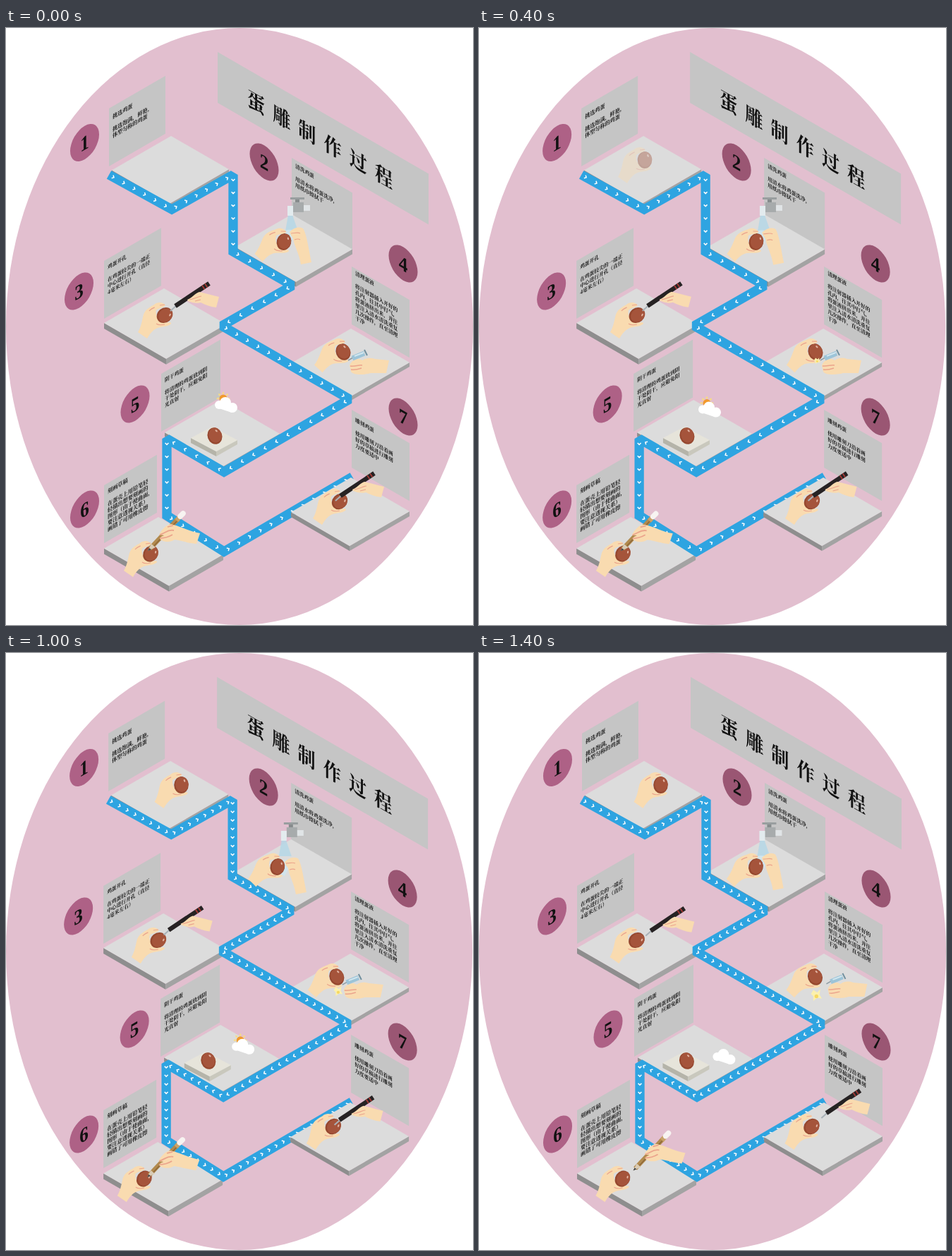
An HTML page for the animation above (1600 ms loop, 662x846 px).

```html
<!DOCTYPE html>
<html lang="zh-CN">
<head>
<meta charset="utf-8">
<style>
html, body { margin: 0; width: 100%; height: 100%; overflow: hidden; background: #fff; }
svg { display: block; width: 100vw; height: 100vh; }
text { font-family: "Noto Serif CJK SC", "Noto Sans CJK SC", "Noto Sans CJK", serif; font-weight: bold; fill: #111; }
.num { font-family: "Liberation Serif", "Noto Serif", serif; text-anchor: middle; }
</style>
</head>
<body>
<svg id="stage" viewBox="0 0 662 846" xmlns="http://www.w3.org/2000/svg"></svg>
<script>
const STEP = 200, COUNT = 8, SLOPE = 0.577;
const SKIN = '#f9dbb0', PINK = '#eba48c', GREY = '#c5c5c5', BLUE = '#2ea4e1';

const poly = (pts, fill) => `<polygon points="${pts}" fill="${fill}"/>`;
const path = (d, fill, extra = '') => `<path d="${d}" fill="${fill}" ${extra}/>`;
const line = (d, color, w, extra = '') => path(d, 'none', `stroke="${color}" stroke-width="${w}" ${extra}`);
const rect = (x, y, w, h, fill) => `<rect x="${x}" y="${y}" width="${w}" height="${h}" fill="${fill}"/>`;
const iso = (x, y, side) => `transform="matrix(.866 ${side * 0.5} 0 1 ${x} ${y})"`;

// Upright isometric wall; side -1 rises to the right, 1 falls
function wall(x, y, w, h, side) {
  const rise = side * w * SLOPE;
  return path(`M${x} ${y}l${w} ${rise}v${h}l${-w} ${-rise}z`, GREY);
}

// Flat isometric box: top corner, reach to the right and left, thickness
function slab(x, y, a, b, h) {
  const right = [x + a, y + a * SLOPE], left = [x - b, y + b * SLOPE];
  const front = [x + a - b, y + (a + b) * SLOPE];
  const down = ([px, py]) => [px, py + h];
  return poly([left, front, down(front), down(left)], '#8e8e8e') +
    poly([front, right, down(right), down(front)], '#a3a3a3') +
    poly([[x, y], right, front, left], '#dcdcdc');
}

const cards = [
  { side: -1, x: 146, y: 114, w: 80, badge: [111.5, 162.5], top: 129, size: 8.2,
    text: '挑选鸡蛋||挑选饱满，鲜艳，|体型匀称的鸡蛋' },
  { side: 1, x: 405, y: 184, w: 86, badge: [366, 190], top: 198,
    text: '清洗鸡蛋||用清水将鸡蛋洗净，|用纸巾擦拭干' },
  { side: -1, x: 139, y: 330, w: 81, badge: [103.5, 373], top: 342,
    text: '鸡蛋开孔||在鸡蛋较尖的一端正|中心进行开孔（直径|4毫米左右）' },
  { side: 1, x: 490, y: 338, w: 82, badge: [563, 334], top: 350,
    text: '清理蛋液||将注射器插入开好的|孔内，往其中打气，|将蛋液挤出来，并往|里注入清水清洗重复|几次操作，直至清理|干净' },
  { side: -1, x: 220, y: 490, w: 84, badge: [183, 533], top: 502,
    text: '阴干鸡蛋||将清理的鸡蛋放到阴|干处阴干，应避免阳|光直射' },
  { side: -1, x: 139, y: 648, w: 75, badge: [111.5, 682], top: 660, size: 8.3,
    text: '刻画草稿||在蛋壳上用铅笔轻|轻描出想要刻画的|图形（由于使曲面，|要注意透视关系）|画错了可用橡皮擦' },
  { side: 1, x: 490, y: 541, w: 82, badge: [563, 551], top: 558,
    text: '雕刻鸡蛋||使用雕刻刀沿着画|好的草稿进行雕刻|力度要适中' }
];

function card({ side, x, y, w, badge, top, text, size = 7.75 }, i) {
  const rows = text.split('|').map((s, n) => `<text y="${n * 9}" font-size="${size}">${s}</text>`).join('');
  return wall(x, y, w, 82, side) +
    `<g ${iso(...badge, side)}><circle r="23.7" fill="${side < 0 ? '#ae6186' : '#9a5673'}"/>` +
    `<text class="num" y="10" font-size="29">${i + 1}</text></g>` +
    `<g ${iso(x + 5, top, side)}>${rows}</g>`;
}

const route = [[146, 208], [235, 257], [322, 208], [322, 317], [406, 365], [306, 422],
  [487, 526], [309, 629], [228, 582], [228, 691], [309, 742], [491, 636]];

function arrows(gap) {
  let d = '';
  for (let i = 1; i < route.length; i++) {
    const [x, y] = route[i - 1], dx = route[i][0] - x, dy = route[i][1] - y;
    const length = Math.hypot(dx, dy), n = Math.round(length / gap);
    const ux = dx / length, uy = dy / length;
    const spot = (cx, cy, a, b) => `${cx + a * ux - b * uy} ${cy + a * uy + b * ux}`;
    for (let k = 0; k < n; k++) {
      const f = (k + 0.4) / n, cx = x + dx * f, cy = y + dy * f;
      d += `M${spot(cx, cy, -1.2, -2.4)}L${spot(cx, cy, 1.2, 0)}L${spot(cx, cy, -1.2, 2.4)}`;
    }
  }
  return line(d, '#fff', 1.5, 'class="arrows"');
}

const scene =
  wall(300, 34, 299, 72, 1) +
  `<text ${iso(342, 109, 1)} font-size="29" letter-spacing="12.8">蛋雕制作过程</text>` +
  cards.map(card).join('') +
  slab(234, 153, 82, 84, 6) +
  slab(405, 264, 86, 80, 7) +
  slab(224, 369, 88, 85, 8) +
  slab(489, 426, 83, 85, 6) +
  slab(305, 527, 83, 80, 6) +
  slab(216, 693, 92, 77, 8) +
  line('M' + route.join('L'), BLUE, 13.3, 'stroke-miterlimit="1.8"') +
  arrows(18) + arrows(12) +
  slab(489, 637, 83, 85, 7);

const egg = a => `<g transform="rotate(${a})"><ellipse rx="10.3" ry="12" fill="#96482f"/>` +
  '<ellipse cx=".8" cy="-.8" rx="9" ry="10.6" fill="#a5543b"/>' +
  '<ellipse cx="4.5" cy="-6" rx="1.1" ry="2" fill="#e3b5a3" transform="rotate(-25 4.5 -6)"/></g>';

const grip = (a, turn = 0) =>
  `<g transform="rotate(${turn})">` +
  path('M-38 24C-33 16-32 6-30-1C-27-9-20-12-15-15C-9-20-2-18 0-14C-3-11-9-11-12-8C-14-2-10 8-2 10C4 11 10 9 9 12C6 16-4 16-10 18C-16 20-21 26-25 33Z', SKIN) +
  line('M-22-6C-18-11-11-12-7-14M-12 12C-9 14-4 14 0 13', PINK, 1.2) + '</g>' + egg(a) +
  `<g transform="rotate(${turn})">${path('M-15-13C-9-19-1-18 1-14C-2-11-8-10-13-7Z', SKIN)}${line('M-7-14L0-15', PINK, 1.2)}</g>`;

const pen =
  line('M2-1L-7 7', '#a9b2b8', 2) +
  line('M0 0L48-32', '#262223', 6.4) +
  line('M39-26L40.5-27M43-28.7L44.5-29.7', '#a63a36', 6.4) +
  path('M17-9C23-11 28-18 34-20C44-18 52-15 62-13L58 2C49 1 42-2 36-5C29-3 24-5 18-7Z', SKIN) +
  line('M20-9C27-10 31-13 37-14M28-7L36-9', PINK, 1.2);

const pencil =
  line('M-47 50L-3 3', '#b28a4e', 6.4) +
  line('M-45 50L-9 11', '#8e6838', 1.6) +
  path('M-45 43L-39 48L-50 53Z', '#d9cbb4') + path('M-48 49L-45 51L-50 53Z', '#444') +
  line('M-9 10L-5 5', '#c9a26a', 6.6) +
  line('M-4 4L0 0', '#f7f3f1', 7.5, 'stroke-linecap="round"') +
  path('M-34 30C-29 21-21 13-14 16C-4 18 8 25 24 28L19 43C8 42-4 38-12 37C-18 41-28 41-33 36C-32 33-30 32-27 31Z', SKIN) +
  line('M-33 30C-25 28-22 22-13 24M-33 35C-26 35-20 33-15 30M-22 19L-14 17', PINK, 1.8);

const tap =
  path('M-14 13H-8L0 36H-18Z', '#b5d7e6', 'opacity=".85"') +
  rect(-11, -12, 20, 3, '#999e9f') + rect(-4, -9, 6, 5, '#868b8c') +
  rect(-7, -5, 15, 14, '#a7abac') + rect(8, -1, 9, 8, '#e0e4e6') + rect(-15, 0, 8, 14, '#e3ebee');

const wiper =
  path('M-5 2C2 0 8 0 12 5L2 24C-6 20-12 15-16 12Z', '#cfe5ee', 'opacity=".85"') +
  path('M2 4C8-2 14-4 21-1C26 6 29 28 33 47L18 50C16 38 12 30 10 24C7 17 8 12 4 9Z', SKIN) +
  line('M4 6C9 6 13 4 17 6M9 15C12 14 14 13 17 15', PINK, 1.2);

const syringe =
  path('M0 23C4 14 12 12 18 16C24 12 30 12 36 14L56 16L52 34L30 34C24 36 6 38 2 32Z', SKIN) +
  line('M-2 16L5 12', '#8c9ba3', 1.6) + line('M4 13L21 6', '#9dc4d8', 7) +
  line('M7 10L20 5', '#d3e7ef', 2) + line('M21 1L25 9', '#6f8f9e', 2) +
  line('M1 24C8 25 13 22 18 23M2 29C8 30 14 28 17 27', PINK, 1.5);

const plate =
  path('M-34 3L2 22V29L-34 10Z', '#b5b4a9') + path('M2 22L32 6V12L2 29Z', '#c9c8bd') +
  path('M-34 3L-4-13L32 6L2 22Z', '#e6e4da') + egg(-20);

const sun = '<circle r="5.5" fill="#f29a2e"/>' +
  Array.from({ length: 8 }, (_, i) => path('M-2-6.5L0-10L2-6.5Z', '#f8dc83', `transform="rotate(${i * 45})"`)).join('');

const cloud = '<g fill="#fff"><circle cx="-10" cy="1" r="6"/><circle cx="-1" cy="-2" r="8"/>' +
  '<circle cx="9" cy="5" r="7"/><path d="M-13 5L8 12L12 2L-8-4Z"/></g>';

const splash = path('M-5-6L0-3L4-7L3 0L6 5L0 4L-5 8L-5 2L-8-1Z', '#fbf0ae') +
  '<circle cx="-1" cy="2" r="2.4" fill="#f6d860"/>';

// Value at k on a line through key points
function along(keys, k) {
  const i = Math.max(1, keys.findIndex(([at]) => at >= k));
  const [k0, v0] = keys[i - 1], [k1, v1] = keys[i];
  return v0 + (v1 - v0) * (k - k0) / (k1 - k0);
}
const sway = k => along([[0, 0], [2, .08], [4, 1], [7, .12]], k);
const pull = k => Math.max(0, (k - 4) / 3) ** 2;

// A part at x, y that sways left by 13 px unless told otherwise, then is pulled away
const swing = (x, y, by = [-13, 0], away = [0, 0]) => k =>
  [x + by[0] * sway(k) + away[0] * pull(k), y + by[1] * sway(k) + away[1] * pull(k)];

const drying = swing(296, 578);
const sky = k => [drying(k)[0] + 16 + 37 * Math.sin(k / 7 * Math.PI / 2), 533 + 2.5 * k ** 1.4];

const actors = [
  { art: grip(0), at: k => [226 + 4.5 * k, 187], alpha: k => Math.min(1, k / 5) },
  { art: tap, at: swing(414, 252) },
  { art: wiper, at: swing(400, 285, [-10, 10]) },
  { art: grip(15, 10), at: swing(394, 303) },
  { art: grip(50), at: swing(225, 407) },
  { art: pen, at: swing(240, 394, [-14, -2], [5, 0]) },
  { art: grip(-22, 8), at: swing(478, 459) },
  { art: splash, at: k => [481 - 13 * sway(k), 466 + 2.6 * k], alpha: k => +(k > 1), size: k => .4 + .1 * k },
  { art: syringe, at: swing(487, 455, [-13, -1], [9, -2]) },
  { art: plate, at: drying },
  { art: sun, at: k => [sky(k)[0] - 4, sky(k)[1] - 8], alpha: k => Math.min(1, (7 - k) / 2) },
  { art: cloud, at: sky },
  { art: grip(35), at: swing(205, 745) },
  { art: pencil, at: swing(251, 688, [-4, 4], [18, -8]) },
  { art: grip(45), at: swing(473, 671) },
  { art: pen, at: swing(474, 663, [-5, 0], [19, -11]) }
];

const stage = document.getElementById('stage');
stage.innerHTML = '<ellipse id="back" cy="423" ry="423" fill="#e2bfcf"/><g id="scene">' + scene + '</g>' +
  actors.map(a => `<g class="actor">${a.art}</g>`).join('');
const back = document.getElementById('back'), base = document.getElementById('scene');
const nodes = stage.querySelectorAll('.actor');
const [sparse, dense] = stage.querySelectorAll('.arrows');

function draw(ms) {
  const k = Math.floor(ms / STEP) % COUNT;
  const drift = -1.1 * Math.sin(Math.PI * k / 7);
  const radius = 331 + drift / 2;
  back.setAttribute('cx', radius);
  back.setAttribute('rx', radius);
  base.setAttribute('transform', `translate(${drift} 0)`);
  sparse.setAttribute('opacity', 1 - k % 2);
  dense.setAttribute('opacity', k % 2);
  actors.forEach(({ at, alpha, size }, i) => {
    nodes[i].setAttribute('transform', `translate(${at(k)}) scale(${size ? size(k) : 1})`);
    nodes[i].setAttribute('opacity', alpha ? alpha(k) : 1);
  });
}

function tick() {
  draw(performance.now());
  requestAnimationFrame(tick);
}
tick();
</script>
</body>
</html>
```
